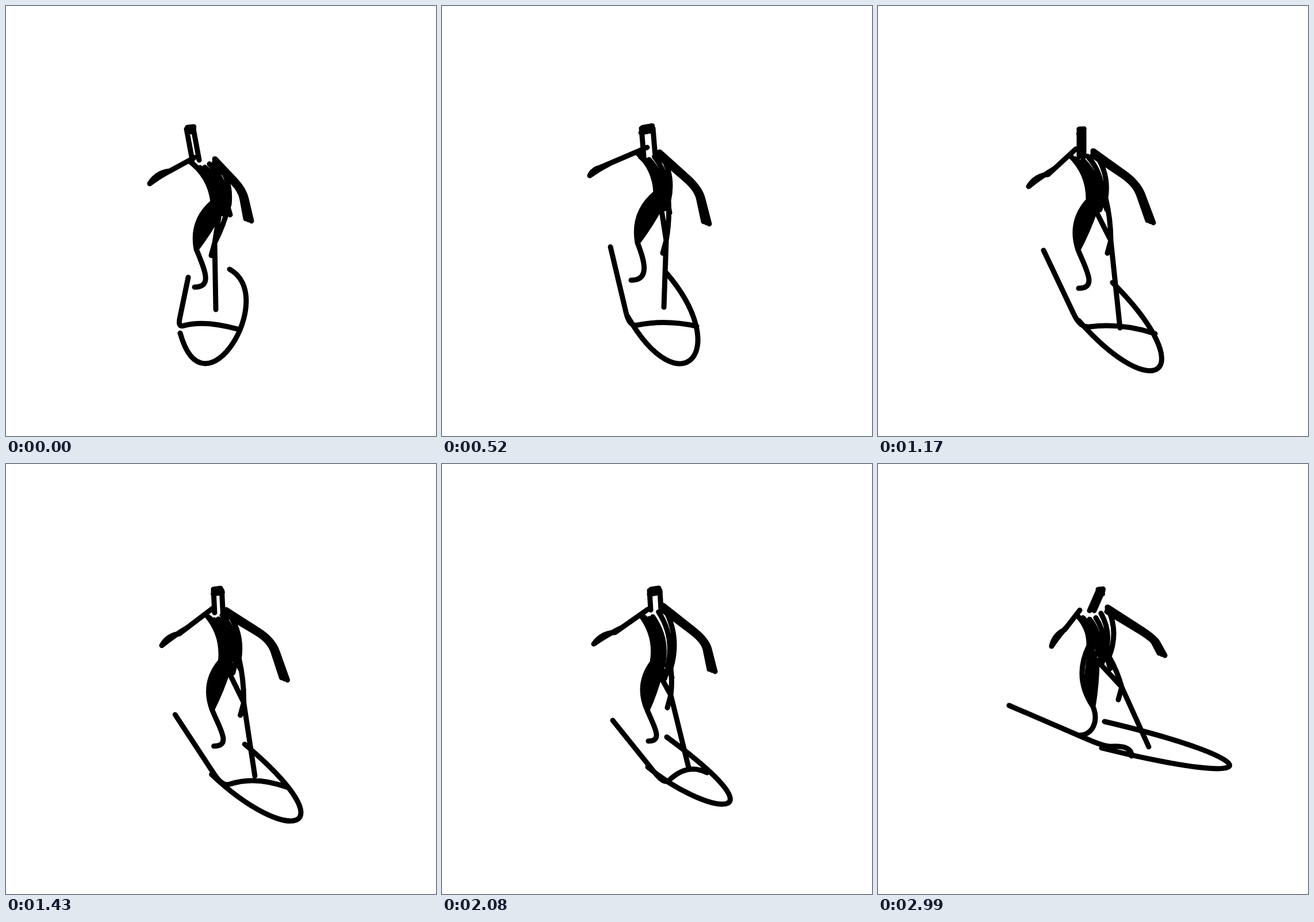
These frames come from a looping animation (748x748 px, 3.12 s). An HTML page:

```html
<!DOCTYPE html>
<html lang="en">
<head>
<meta charset="utf-8">
<title>Surfer</title>
<style>
  html, body { margin: 0; width: 100%; height: 100%; overflow: hidden; background: #fff; }
  svg { display: block; width: 100%; height: 100%; }
  path { fill: none; stroke: #000; stroke-width: 9; stroke-linecap: round; stroke-linejoin: round; }
</style>
</head>
<body>
<svg viewBox="0 0 748 748"><path id="ink"/></svg>
<script>
const STEP = 130, STEPS = 24;
const KEYS = [0, 4, 9, 13, 16, 20, 23]; // step at which each pose is reached
const ink = document.getElementById('ink');

// Each point moves through seven poses
const board = {
  tail:   [[317,472], [293,419], [288,425], [301,447], [297,446], [266,382], [228,420]],
  corner: [[299,559], [326,558], [352,560], [398,562], [387,558], [363,524], [395,492]],
  arch:   [[345,546], [388,545], [424,551], [438,530], [427,520], [407,503], [442,489]],
  side:   [[403,562], [443,557], [482,570], [492,552], [461,537], [440,514], [441,508]],
  under:  [[303,569], [323,540], [349,547], [363,531], [358,527], [334,492], [389,494]],
  pullA:  [[345,720], [415,700], [482,698], [485,627], [453,608], [423,594], [690,568]],
  pullB:  [[475,505], [507,600], [565,639], [628,643], [609,635], [593,623], [680,515]],
  rail:   [[389,458], [390,464], [408,481], [417,490], [391,475], [379,442], [394,448]]
};
const upper = {
  head:   [[320,214], [357,213], [354,217], [382,222], [370,220], [353,218], [387,221]],
  neck:   [[330,268], [361,262], [354,262], [386,255], [372,254], [356,250], [372,255]],
  shL:    [[318,269], [338,254], [333,259], [360,262], [345,262], [328,252], [345,262]],
  elbowL: [[285,287], [275,281], [296,293], [304,296], [301,293], [282,276], [325,288]],
  handL:  [[250,309], [257,295], [262,314], [278,315], [264,313], [263,291], [302,317]],
  shR:    [[363,266], [378,254], [374,252], [390,254], [384,246], [376,246], [399,249]],
  elbowR: [[407,320], [442,318], [446,309], [467,305], [454,307], [437,301], [475,303]],
  handR:  [[422,372], [460,377], [474,375], [491,371], [470,359], [450,348], [494,331]]
};
const lower = {
  waist:  [[360,341], [372,325], [366,338], [380,346], [366,345], [356,318], [367,316]],
  hip:    [[388,345], [394,338], [396,334], [413,345], [398,355], [391,342], [402,335]],
  kneeL:  [[331,423], [340,412], [348,424], [367,429], [357,428], [338,392], [374,422]],
  footL:  [[328,489], [329,477], [349,491], [371,488], [359,482], [337,448], [349,472]],
  kneeR:  [[363,412], [390,408], [405,408], [418,420], [398,402], [386,386], [424,388]],
  footR:  [[365,528], [386,524], [421,560], [440,521], [429,528], [404,485], [471,492]]
};
const face = { half: [[6], [10], [4], [11], [9], [4], [4]] }; // half width of the head

const lerp = (a, b, u) => a.map((c, i) => c + (b[i] - c) * u);
const move = (p, x, y) => [p[0] + x, p[1] + y];
const str = p => p.map(c => c.toFixed(1)).join(' ');

// Smooth motion through the poses of every point in a group
function poseAt(group, step) {
  let k = 0;
  while (k < KEYS.length - 2 && step >= KEYS[k + 1]) k++;
  const span = KEYS[k + 1] - KEYS[k];
  const u = (step - KEYS[k]) / span, v = 1 - u;
  const out = {};
  for (const [name, poses] of Object.entries(group)) {
    const slope = (j, i) => {
      const a = Math.max(j - 1, 0), b = Math.min(j + 1, KEYS.length - 1);
      return (poses[b][i] - poses[a][i]) / (KEYS[b] - KEYS[a]);
    };
    out[name] = poses[k].map((c, i) =>
      c * v * v * (1 + 2 * u) + poses[k + 1][i] * u * u * (3 - 2 * u) +
      span * u * v * (slope(k, i) * v - slope(k + 1, i) * u));
  }
  return out;
}

function seeded(seed) {
  let s = seed * 7919 + 17;
  return () => (s = (s * 16807) % 2147483647) / 2147483647;
}

const line = (...pts) => 'M' + pts.map(str).join('L');
const cubic = (a, b, c, d) => 'M' + str(a) + 'C' + [b, c, d].map(str).join(' ');

// One arc; a positive bend bows to the left of a downward stroke
function bow(a, b, bend) {
  const mid = move(lerp(a, b, .5), (a[1] - b[1]) * bend, (b[0] - a[0]) * bend);
  return 'M' + str(a) + 'Q' + str(mid) + ' ' + str(b);
}

// Limb that bends softly at its joint
function limb(a, joint, b, soft = .3) {
  return 'M' + str(a) + 'L' + str(lerp(joint, a, soft)) +
    'Q' + str(joint) + ' ' + str(lerp(joint, b, soft)) + 'L' + str(b);
}

function drawBoard(step) {
  const b = poseAt(board, step);
  if (step > 4 && step < 9) {
    const dip = 9 * Math.sin(Math.PI * (step - 4) / 5) ** 2;
    for (const name in b) b[name] = move(b[name], 0, dip);
  }
  const turn = lerp(b.corner, b.arch, .22);
  return 'M' + str(b.tail) + 'L' + str(lerp(b.tail, b.corner, .82)) +
    'Q' + str(b.corner) + ' ' + str(turn) + 'Q' + str(b.arch) + ' ' + str(b.side) +
    cubic(b.under, b.pullA, b.pullB, b.rail);
}

function drawUpper(p, rnd) {
  const w = p.half[0];
  let d = '';
  for (const s of [-w, w]) d += line(move(p.head, s, 0), move(p.neck, s, 0));
  const hair = [];
  for (let i = 0; i < 6; i++) {
    const x = (i % 2 ? 1 : -1) * (w + 1) * (.6 + .4 * rnd());
    hair.push(move(p.head, x, i * 2 - 4 - x * .3));
  }
  d += line(...hair);

  d += line(lerp(p.elbowL, p.shL, 1.3), p.elbowL) + bow(p.elbowL, p.handL, .25);
  d += bow(lerp(p.elbowL, p.shL, .3), p.handL, .04);
  for (const k of [-1, 0, 1]) {
    d += limb(move(p.shR, -k, 4 + 4 * k), move(p.elbowR, 4 - 3 * k, k), move(p.handR, -5 * k, -2 * k));
  }
  return d;
}

function drawTorso(p, rnd) {
  const strokes = 6;
  let d = '';
  for (let i = 0; i < strokes; i++) {
    const u = i / (strokes - 1), inside = Math.sin(Math.PI * u);
    const shake = inside * 4 * (rnd() - .5);
    const top = move(lerp(p.shL, p.shR, u), shake, inside * 14);
    d += bow(top, move(lerp(p.waist, p.hip, u), shake, 0), -.22);
  }
  const zigzag = [];
  for (let i = 0; i < 6; i++) {
    zigzag.push(move(lerp(p.waist, p.hip, i / 5), 2, i % 2 ? 16 + 8 * rnd() : 0));
  }
  return d + line(...zigzag);
}

function drawLegs(p) {
  const shin = p.footL[1] - p.kneeL[1];
  const crotch = move(lerp(p.waist, p.hip, .4), 0, 18);
  let d = cubic(p.kneeL, move(p.kneeL, shin * .2, shin * .5), move(p.footL, shin * .5, 0), p.footL);
  for (let i = 0; i < 4; i++) {
    d += bow(lerp(p.waist, crotch, i / 3), p.kneeL, .29 - .11 * i);
  }
  return d + line(crotch, p.kneeR) + bow(p.hip, p.kneeR, -.06) +
    line(p.kneeR, p.footR) + line(p.kneeR, move(p.kneeR, -6, 22));
}

function draw(step) {
  const rnd = seeded(step + 1);
  const p = { ...poseAt(upper, step), ...poseAt(lower, step), ...poseAt(face, step) };
  ink.setAttribute('d', drawBoard(step) + drawUpper(p, rnd) + drawTorso(p, rnd) + drawLegs(p));
}

let shown = -1;
function tick() {
  const step = Math.floor(performance.now() / STEP) % STEPS;
  if (step !== shown) draw(shown = step);
  requestAnimationFrame(tick);
}
tick();
</script>
</body>
</html>
```
